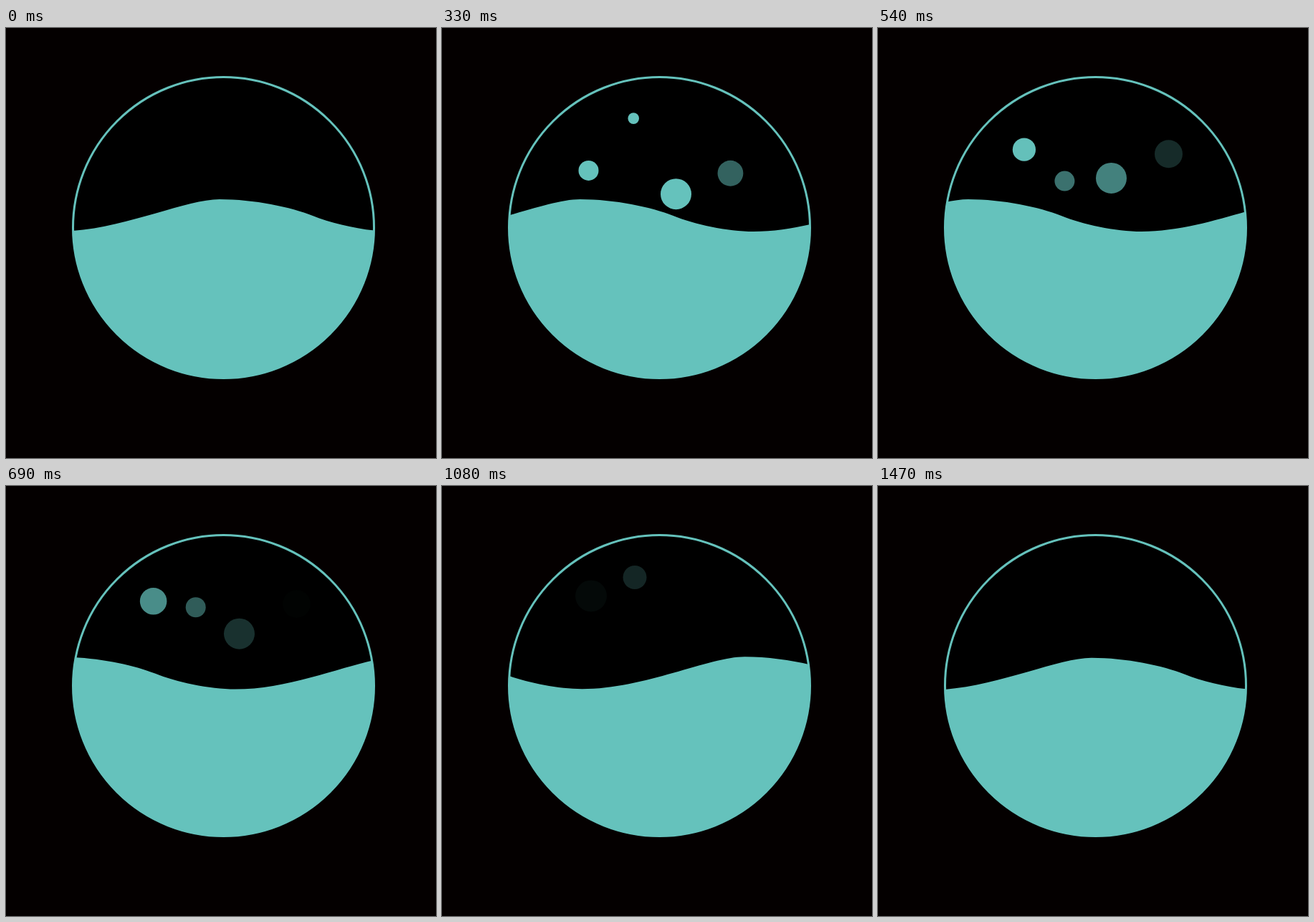
An HTML page with a canvas for the animation above (1500 ms loop, 600 by 600 pixels).

```html
<!DOCTYPE html>
<html lang="en">
<head>
<meta charset="utf-8">
<title>Bubbling flask</title>
<style>
  html, body { margin: 0; width: 100%; height: 100%; overflow: hidden; background: #040000; }
  canvas { display: block; }
</style>
</head>
<body>
<canvas id="stage" width="600" height="600"></canvas>
<script>
const ctx = document.getElementById('stage').getContext('2d');
const LOOP = 1500, STEP = 30, TRAVEL = 1470;
const WAVE = 469, CREST_X = 298, CREST_Y = 239;
const CX = 303.5, CY = 278.5, RADIUS = 210;
const TEAL = '#65c2bc';

// Linear change from v0 to v1, held outside t0..t1
const ramp = (t, t0, v0, t1, v1) =>
  v0 + (v1 - v0) * Math.min(1, Math.max(0, (t - t0) / (t1 - t0)));

// Rise that slows down towards a resting height
const settle = (t, rest, depth, tau) => rest + depth * Math.exp((210 - t) / tau);

// Each bubble gives x, y, radius and opacity
const bubbles = [
  t => [203 + Math.min(5, Math.abs(t - 460) * .0115), settle(t, 152, 82, 215),
    ramp(t, 420, 14, 870, 22), ramp(t, 535, 1, 1104, 0)],
  t => [ramp(t, 210, 265.5, 420, 268.5), settle(t, 116, 29.5, 112),
    ramp(t, 260, 6.5, 420, 9.5), ramp(t, 420, 1, 510, 0)],
  t => [ramp(t, 210, 400, 480, 405.5), settle(t, 145.5, 82.5, 328),
    ramp(t, 210, 17, 540, 19.5), ramp(t, 100, .82, 700, 0)],
  t => [ramp(t, 420, 326.5, 540, 325.5), settle(t, 204.8, 73, 120),
    21.5, ramp(t, 420, 1, 780, 0)],
  t => [ramp(t, 420, 257, 840, 269), ramp(t, 330, 275.5, 840, 125) + ramp(t, 840, 0, 1080, 2.5),
    ramp(t, 840, 14, 1080, 16.5), ramp(t, 420, .67, 1350, 0)]
];

function disc(x, y, r) {
  ctx.beginPath();
  ctx.arc(x, y, r, 0, Math.PI * 2);
}

function drawBubble([x, y, r, opacity]) {
  ctx.globalAlpha = opacity;
  disc(x, y, r);
  ctx.fill();
  ctx.globalAlpha = 1;
}

function drawWater(t) {
  const top = CREST_Y + ramp(t, 540, 0, 840, -.8) + ramp(t, 1080, 0, TRAVEL, 1.6);
  let x = CREST_X - WAVE * t / TRAVEL - WAVE;
  const curve = (...p) => ctx.bezierCurveTo(...p.map((v, i) => v + (i % 2 ? top : x)));
  ctx.beginPath();
  ctx.moveTo(x, top);
  for (let i = 0; i < 3; i++, x += WAVE) {
    curve(48, 0, 100, 11, 130, 23);
    curve(160, 35, 205, 45, 242, 45);
    curve(329, 45, 419, 0, WAVE, 0);
  }
  ctx.lineTo(x, 600);
  ctx.lineTo(x - 3 * WAVE, 600);
  ctx.fill();
}

function draw(now) {
  const t = Math.floor(now % LOOP / STEP) * STEP;
  ctx.fillStyle = '#040000';
  ctx.fillRect(0, 0, 600, 600);
  ctx.save();
  disc(CX, CY, RADIUS);
  ctx.fillStyle = '#000';
  ctx.fill();
  ctx.clip();
  ctx.fillStyle = TEAL;
  bubbles.forEach(bubble => drawBubble(bubble(t)));
  drawWater(t);
  ctx.restore();
  disc(CX, CY, RADIUS);
  ctx.strokeStyle = TEAL;
  ctx.lineWidth = 3;
  ctx.stroke();
}

const start = performance.now();
function tick() {
  draw(performance.now() - start);
  requestAnimationFrame(tick);
}
tick();
</script>
</body>
</html>
```
